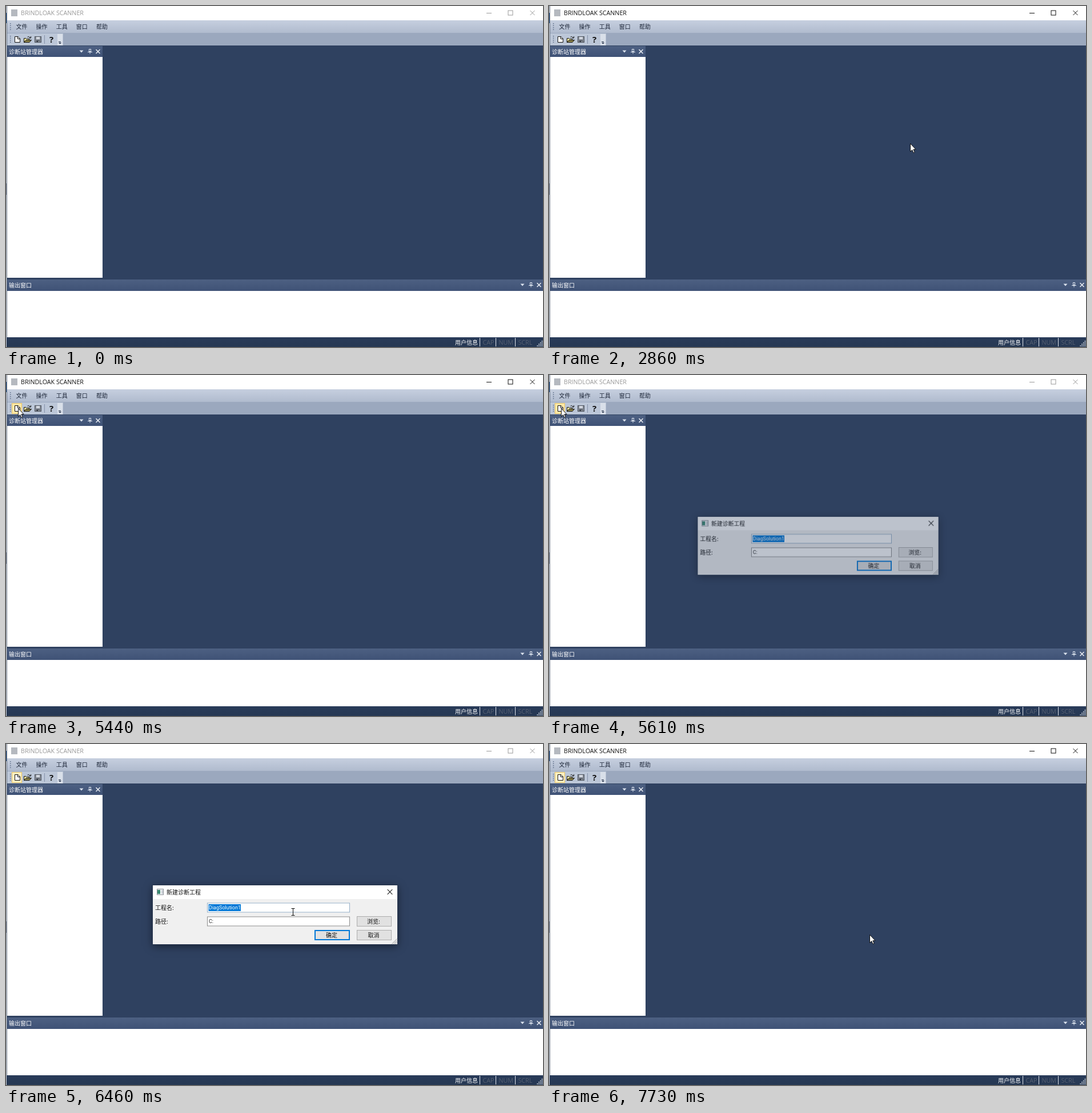
These frames come from a looping animation (940 by 596 pixels, 8 s). An HTML page with a canvas:

```html
<!DOCTYPE html>
<html lang="zh-CN">
<head>
<meta charset="utf-8">
<title>新建诊断工程</title>
<style>
html, body { margin: 0; width: 100%; height: 100%; overflow: hidden; background: #2f4160; }
canvas { display: block; }
</style>
</head>
<body>
<canvas id="stage" width="940" height="596"></canvas>
<script>
const LOOP = 8000, W = 940, H = 596;
const CJK = '"Noto Sans CJK SC", "Noto Sans CJK", sans-serif';
const UI = '"Open Sans", "Noto Sans", sans-serif';
const main = document.getElementById('stage').getContext('2d');
const layer = document.createElement('canvas');
layer.width = W;
layer.height = H;
const layerCtx = layer.getContext('2d');
let c = main;

function rect(x, y, w, h, fill) {
  c.fillStyle = fill;
  c.fillRect(x, y, w, h);
}

function frame(x, y, w, h, stroke, fill, line = 1) {
  if (fill) rect(x, y, w, h, fill);
  c.strokeStyle = stroke;
  c.lineWidth = line;
  c.strokeRect(x + line / 2, y + line / 2, w - line, h - line);
}

function shade(x, y, w, h, top, bottom) {
  const g = c.createLinearGradient(0, y, 0, y + h);
  g.addColorStop(0, top);
  g.addColorStop(1, bottom);
  rect(x, y, w, h, g);
}

function trace(points, close) {
  c.beginPath();
  points.forEach(([x, y]) => c.lineTo(x, y));
  if (close) c.closePath();
}

function poly(points, fill, stroke, line = 1) {
  trace(points, true);
  if (fill) { c.fillStyle = fill; c.fill(); }
  if (stroke) { c.strokeStyle = stroke; c.lineWidth = line; c.stroke(); }
}

function lines(color, width, ...segments) {
  c.strokeStyle = color;
  c.lineWidth = width;
  for (const s of segments) { trace(s); c.stroke(); }
}

// y is the visual middle of the line
function text(str, x, y, color, size = 10, font = CJK, align = 'left') {
  c.font = `${size}px ${font}`;
  c.textAlign = align;
  c.fillStyle = color;
  c.fillText(str, x, y + size * 0.37);
}

function cross(x, y, r, color, width) {
  lines(color, width, [[x - r, y - r], [x + r, y + r]], [[x + r, y - r], [x - r, y + r]]);
}

function paneHeader(x, y, w, h, label) {
  shade(x, y, w, h, '#4d6082', '#3f5276');
  text(label, x + 3, y + 10.3, '#fff');
  const r = x + w, m = y + 9.5;
  poly([[r - 40.5, m - 2], [r - 33.5, m - 2], [r - 37, m + 2]], '#dce3ee');
  frame(r - 24, m - 4.5, 4, 5, '#dce3ee');
  rect(r - 26, m + 0.5, 8, 1, '#dce3ee');
  rect(r - 22.5, m + 1, 1, 3, '#dce3ee');
  cross(r - 8, m, 3.5, '#eef1f6', 1.5);
}

function titleBar(active) {
  const ink = active ? '#111' : '#999';
  rect(2, 0, W - 2, 25, '#fff');
  rect(9, 6, 11, 12, '#b5b9bf');
  text('BRINDLOAK SCANNER', 26, 12, ink, 10.7, UI);
  rect(841, 12, 9, 1, ink);
  frame(878.5, 7.5, 9, 9, ink);
  cross(921.5, 12, 4, ink, 1);
}

function toolbar(hot) {
  shade(2, 25, W - 2, 22, '#c6cfdf', '#b0bbce');
  rect(2, 47, W - 2, 22, '#9ba8be');
  rect(2, 48, 98, 21, '#bcc7d8');
  for (let i = 0; i < 4; i++) {
    rect(7, 30 + i * 3.5, 1.5, 1.5, '#5c6d88');
    rect(7, 52 + i * 3.5, 1.5, 1.5, '#5c6d88');
  }
  ['文件', '操作', '工具', '窗口', '帮助'].forEach((s, i) => text(s, 17.5 + i * 35.1, 36, '#1b2436'));

  if (hot) frame(10, 49, 18, 19, '#e5c365', hot);
  poly([[15.5, 53.5], [21, 53.5], [24.5, 57], [24.5, 63.5], [15.5, 63.5]], '#fff', '#111');
  lines('#111', 1, [[20.5, 53.5], [20.5, 57.5], [24.5, 57.5]]);

  poly([[31.5, 63.5], [31.5, 56.5], [35, 56.5], [36, 57.5], [40.5, 57.5], [40.5, 59.5]], '#f2e6a0', '#111');
  poly([[31.5, 63.5], [35, 59.5], [44.5, 59.5], [41, 63.5]], '#8a8148', '#111');
  lines('#111', 1, [[37.5, 54.5], [39.5, 53.5], [42.5, 55.5]], [[43.5, 53], [43.5, 56], [40.5, 56]]);

  frame(50, 53, 12, 11, '#4a505a', '#858b95');
  rect(53, 54, 6, 4, '#d4d9e1');
  rect(53, 60, 6, 3, '#4a505a');
  rect(57, 61, 1, 2, '#d4d9e1');

  rect(67, 51, 1, 15, '#8391a9');
  c.font = `bold 15px ${UI}`;
  c.textAlign = 'center';
  c.fillStyle = '#111';
  c.fillText('?', 79.5, 64);
  rect(90, 49, 9, 20, '#d9dfe9');
  rect(92, 62, 4, 1, '#26334b');
  poly([[92, 64], [97, 64], [94.5, 66.5]], '#26334b');
}

function statusBar(message) {
  shade(1, 579, W - 1, 17, '#293b59', '#263853');
  text(message, 4, 588, '#fff');
  text('用户信息', 786, 588, '#fff');
  [829, 857, 891].forEach(x => rect(x, 580, 1, 15, '#dfe4ec'));
  text('CAP', 834.5, 588, '#566072', 10.7, UI);
  text('NUM', 862.5, 588, '#566072', 10.7, UI);
  text('SCRL', 896.5, 588, '#566072', 10.7, UI);
  for (let row = 0; row < 4; row++)
    for (let col = 3 - row; col < 4; col++)
      rect(929.5 + col * 2.7, 585 + row * 2.7, 1.6, 1.6, '#dfe4ec');
}

function leftEdge() {
  rect(0, 0, 1, H, '#d3d6dc');
  rect(1, 0, 1, 579, '#66707f');
  rect(0, 12, 1, 18, '#1d4a80');
  rect(0, 310, 1, 20, '#858a98');
}

function button(x, y, w, label, border, fill, line) {
  frame(x, y, w, 18, border, fill, line);
  text(label, x + w / 2 - 1, y + 9.5, '#111', 10, CJK, 'center');
}

function dialog(selected, okFill) {
  c.save();
  c.shadowColor = 'rgba(0,0,0,.5)';
  c.shadowBlur = 14;
  c.shadowOffsetY = 3;
  rect(257, 247, 428, 103, '#f0f0f0');
  c.restore();
  frame(256, 246, 430, 105, '#26344d');
  rect(257, 247, 428, 24, '#fff');
  frame(264, 253, 12, 11, '#8d9299', '#f4f6f8');
  rect(265, 255, 5, 7, '#3a8a72');
  rect(272, 255, 3, 7, '#cdd2d8');
  text('新建诊断工程', 281, 259, '#111');
  cross(672, 258.5, 4.3, '#222', 1.1);

  text('工程名:', 261, 286, '#111');
  text('路径:', 261, 310, '#111');
  frame(352, 277.5, 250, 17, selected ? '#93aec6' : '#8a8a8a', '#fff');
  if (selected) rect(354.5, 280, 56.5, 12, '#0078d7');
  text('DiagSolution1', 355, 286, selected ? '#fff' : '#111', 9, 'Roboto, sans-serif');
  frame(352, 301.5, 250, 17, '#8a8a8a', '#fff');
  text('C:', 355, 310, '#222', 9, 'Roboto, sans-serif');

  button(614, 301, 61, '浏览:', '#adadad', '#e1e1e1');
  button(540, 325, 62, '确定', '#0078d7', okFill, 2);
  button(614, 325, 61, '取消', '#adadad', '#e1e1e1');
  for (let d = 3; d <= 9; d += 3) lines('#9a9a9a', 1, [[684.5 - d, 349.5], [684.5, 349.5 - d]]);
}

function drawDialog(alpha, scale, selected, okFill) {
  c = layerCtx;
  c.clearRect(0, 0, W, H);
  dialog(selected, okFill);
  c = main;
  c.save();
  c.globalAlpha = alpha;
  c.translate(471, 298.5);
  c.scale(scale, scale);
  c.drawImage(layer, -471, -298.5);
  c.restore();
}

function caption(str) {
  c.font = `bold 50px ${CJK}`;
  c.textAlign = 'center';
  c.lineJoin = 'round';
  c.lineWidth = 6;
  c.strokeStyle = '#f00';
  c.strokeText(str, 468, 316);
  c.lineWidth = 1.2;
  c.strokeStyle = c.fillStyle = '#fff';
  c.strokeText(str, 468, 316);
  c.fillText(str, 468, 316);
  c.lineJoin = 'miter';
}

function tooltip(alpha) {
  c.globalAlpha = alpha;
  frame(21, 74, 65, 17, '#767676', '#fff');
  text('新建诊断工程', 23.5, 82.5, '#575757');
  c.globalAlpha = 1;
}

// Pointer moves: curve from a to b bent toward m, in n held steps
const moves = [
  { t0: 2860, t1: 3410, n: 8, p: 1.6, a: [759, 261], m: [428, 210], b: [96, 135] },
  { t0: 3730, t1: 4280, n: 8, p: 1.6, a: [96, 135], m: [58, 96], b: [21, 58] },
  { t0: 5990, t1: 6780, n: 11, p: 2.28, a: [21, 58], m: [288, 118], b: [555, 334] },
  { t0: 6850, t1: 6851, n: 1, p: 1, a: [555, 334], m: [558, 337], b: [561, 340] },
  { t0: 7100, t1: 7250, n: 3, p: 1, a: [561, 340], m: [561, 336], b: [561, 333] }
];

function pointer(t) {
  const mv = moves.filter(v => t >= v.t0).pop();
  if (!mv) return moves[0].a;
  const part = Math.min(1, (t - mv.t0) / (mv.t1 - mv.t0));
  const step = Math.floor(part * (mv.n - 1) + 0.06) + 1;
  const s = 1 - Math.pow(1 - step / mv.n, mv.p), r = 1 - s;
  return [0, 1].map(i => Math.round(r * r * mv.a[i] + 2 * r * s * mv.m[i] + s * s * mv.b[i]));
}

function arrow(x, y) {
  const shape = [[0, 0], [0, 14], [3.2, 11], [5.4, 16], [7.6, 15], [5.4, 10.2], [9.6, 10.2]];
  poly(shape.map(([a, b]) => [x + 0.5 + a, y + 0.5 + b]), '#fff', '#111', 1);
}

function beam(x, y) {
  lines('#111', 1, [[x + 0.5, y - 5], [x + 0.5, y + 6]],
    [[x - 2.5, y - 5.5], [x + 3.5, y - 5.5]], [[x - 2.5, y + 6.5], [x + 3.5, y + 6.5]]);
}

// Value of the last [time, value] entry reached
function at(t, track) {
  return track.filter(k => t >= k[0]).pop()[1];
}

const titleOn = [[0, false], [150, true], [5450, false], [7640, true]];
const dialogPose = [[0, null], [5530, [0.25, 0.955]], [5610, [0.68, 0.984]], [5680, [0.93, 0.996]],
  [5760, [1, 1]], [7560, [0.7, 0.98]], [7640, [0.2, 0.94]], [7730, null]];
const tipAlpha = [[0, 0], [4890, 0.5], [4970, 1], [5290, 0]];
const okFill = [[0, '#e1e1e1'], [6780, '#e5f1fb'], [7390, '#cce4f7'], [7560, '#e5f1fb']];

function draw(t) {
  const [x, y] = pointer(t);
  const overNew = t > 3730 && (t >= 5290 || (x < 28 && y < 68));
  const hot = overNew && (t >= 5290 && t < 5680 ? '#ffe8a6' : '#fff0c0');

  rect(0, 0, W, H, '#2f4160');
  titleBar(at(t, titleOn));
  toolbar(hot);
  paneHeader(2, 70, 167, 19, '诊断站管理器');
  rect(2, 89, 167, 386, '#fff');
  paneHeader(2, 478, 939, 20, '输出窗口');
  rect(2, 498, 938, 81, '#fff');
  leftEdge();
  statusBar(overNew && t < 5370 ? '新建诊断工程' : '');

  if (t >= 790 && t < 2860) caption('新建诊断工程');
  const tip = at(t, tipAlpha);
  if (tip) tooltip(tip);
  const pose = at(t, dialogPose);
  if (pose) drawDialog(...pose, t < 7390, at(t, okFill));

  if (t < 530) return;
  const overEdit = pose && x > 352 && x < 602 && ((y > 277 && y < 294) || (y > 301 && y < 319));
  (overEdit ? beam : arrow)(x, y);
}

const start = performance.now();
function tick() {
  draw((performance.now() - start) % LOOP);
  requestAnimationFrame(tick);
}
tick();
</script>
</body>
</html>
```
